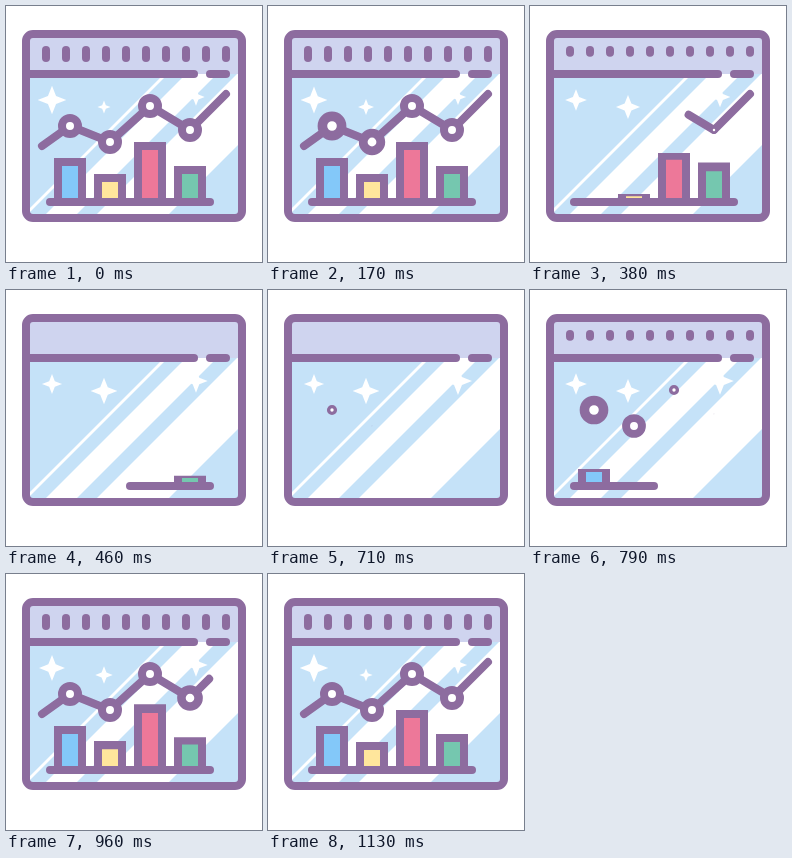
These frames come from a looping animation (256x256 px, 1180 ms). An HTML page with a canvas:

```html
<!DOCTYPE html>
<html lang="en">
<head>
<meta charset="utf-8">
<title>Chart window</title>
<style>
  html, body { margin: 0; width: 100%; height: 100%; overflow: hidden; background: #fff; }
  canvas { display: block; width: 256px; height: 256px; }
</style>
</head>
<body>
<canvas id="stage" width="256" height="256"></canvas>
<script>
const ctx = document.getElementById('stage').getContext('2d');
const LOOP = 1180, STEPS = 28, FPS = 24;
const PURPLE = '#8d6c9f', BLUE = '#c5e2f8', LILAC = '#cfd4ef';

const trend = [[36, 140], [64, 120], [104, 136], [144, 100], [184, 124], [220, 88]];
const bars = [[52, 152, '#83c8f9'], [92, 168, '#ffe69c'], [132, 136, '#ed7899'], [172, 160, '#75c7af']];

// Eased progress from step a to step b
function ease(n, a, b) {
  const x = Math.min(1, Math.max(0, (n - a) / (b - a)));
  return x * x * (3 - 2 * x);
}

// Swell then vanish from step `out`; grow past full size then settle from step `back`
function pop(n, out, back, peak) {
  if (n < 14) return (1 + (peak - 1) * ease(n, out, out + 2)) * (1 - ease(n, out + 2, out + 5));
  return peak * ease(n, back, back + 3) - (peak - 1) * ease(n, back + 3, back + 5);
}

// Cosine swing between lo and hi, largest at step `top`
function swing(n, lo, hi, top) {
  return (lo + hi) / 2 + (hi - lo) / 2 * Math.cos(2 * Math.PI * (n - top) / STEPS);
}

// Stroke the part of a polyline between fractions a and b
function trim(pts, a = 0, b = 1) {
  if (b - a < 0.001) return;
  let len = 0;
  ctx.beginPath();
  pts.forEach(([x, y], i) => {
    ctx.lineTo(x, y);
    if (i) len += Math.hypot(x - pts[i - 1][0], y - pts[i - 1][1]);
  });
  ctx.setLineDash(b - a < 1 ? [(b - a) * len, 999] : []);
  ctx.lineDashOffset = -a * len;
  ctx.stroke();
  ctx.setLineDash([]);
}

// Diagonal band where x + y lies between a and b
function band(a, b) {
  ctx.beginPath();
  ctx.moveTo(a - 68, 68);
  ctx.lineTo(b - 68, 68);
  ctx.lineTo(b - 212, 212);
  ctx.lineTo(a - 212, 212);
  ctx.fill();
}

function star(x, y, r) {
  ctx.beginPath();
  for (let i = 0; i < 8; i++) {
    const d = i % 2 ? r * 0.4 : r, a = i * Math.PI / 4;
    ctx.lineTo(x + d * Math.cos(a), y + d * Math.sin(a));
  }
  ctx.fill();
}

function bar([x, top, color], s) {
  if (s < 0.01) return;
  ctx.save();
  ctx.translate(0, 196);
  ctx.scale(1, s);
  ctx.lineJoin = 'miter';
  ctx.lineCap = 'butt';
  ctx.fillStyle = color;
  ctx.beginPath();
  ctx.moveTo(x, 0);
  ctx.lineTo(x, top - 192);
  ctx.lineTo(x + 24, top - 192);
  ctx.lineTo(x + 24, 0);
  ctx.fill();
  ctx.stroke();
  ctx.restore();
}

function ring([x, y], s) {
  if (s < 0.01) return;
  ctx.save();
  ctx.translate(x, y);
  ctx.scale(s, s);
  ctx.beginPath();
  ctx.arc(0, 0, 8, 0, 7);
  ctx.fill();
  ctx.stroke();
  ctx.restore();
}

function draw(n) {
  const leaving = n < 14;
  ctx.fillStyle = '#fff';
  ctx.fillRect(0, 0, 256, 256);

  // Window glass, header and sparkles
  ctx.save();
  ctx.beginPath();
  ctx.roundRect(20, 28, 216, 184, 7);
  ctx.clip();
  ctx.fillStyle = BLUE;
  ctx.fillRect(20, 28, 216, 184);
  ctx.fillStyle = '#fff';
  band(226, 230);
  band(248, 279);
  band(299, 371);
  star(46, 94, swing(n, 9.5, 14.3, 0));
  star(98, 101, swing(n, 6.5, 14.2, 14));
  star(190, 91, swing(n, 8, 14, 17));
  ctx.fillStyle = LILAC;
  ctx.fillRect(20, 28, 216, 40);
  ctx.restore();

  ctx.strokeStyle = PURPLE;
  ctx.lineWidth = 8;
  ctx.lineCap = ctx.lineJoin = 'round';
  ctx.beginPath();
  ctx.roundRect(20, 28, 216, 184, 7);
  ctx.stroke();
  trim([[20, 68], [188, 68]]);
  trim([[204, 68], [220, 68]]);

  const tick = leaving ? 1 - ease(n, 6, 11) : ease(n, 17, 22);
  for (let x = 40; x <= 220; x += 20) trim([[x, 44], [x, 52]], 0, tick);

  bars.forEach((b, i) => bar(b, pop(n, 4 + i, 17.8 + i, 1.1)));

  const base = [[44, 196], [204, 196]];
  if (leaving) {
    trim(base, ease(n, 9, 13), 1);
    trim(trend, ease(n, 6, 11), 1);
  } else {
    trim(base, 0, ease(n, 17, 21));
    trim(trend, 0, ease(n, 19, 24));
  }

  ctx.fillStyle = '#fff';
  trend.slice(1, 5).forEach((p, i) => ring(p, pop(n, 2 + i, 15.8 + i, 1.2)));
}

const start = performance.now();
function tickClock() {
  const t = (performance.now() - start) % LOOP;
  draw(Math.min(STEPS - 1, Math.floor((t + 4) * FPS / 1000)));
  requestAnimationFrame(tickClock);
}
tickClock();
</script>
</body>
</html>
```
